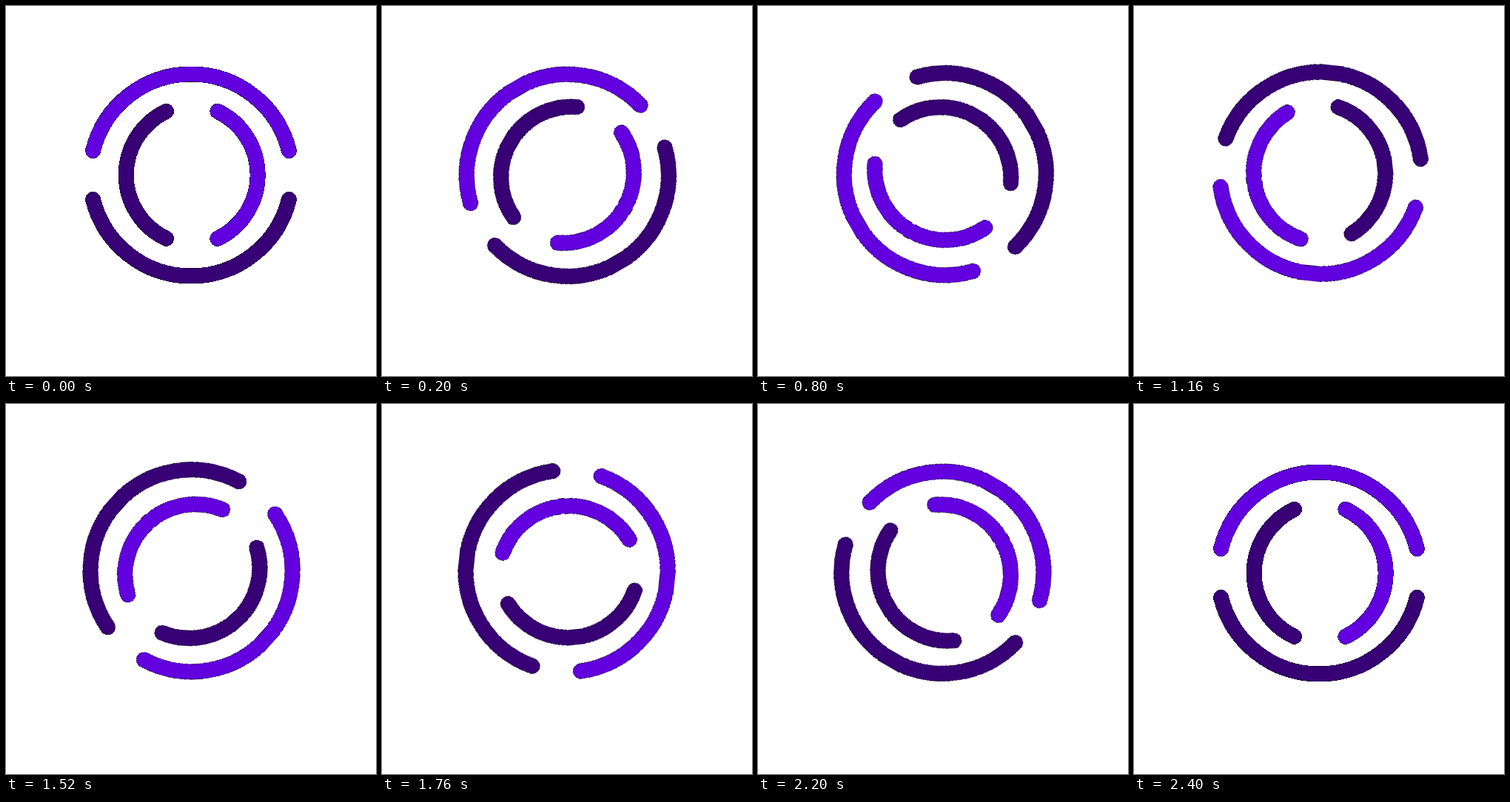
An HTML page without scripts for the animation above (2.42 s loop, 500 by 500 pixels).

```html
<!DOCTYPE html>
<html lang="en">
<head>
<meta charset="utf-8">
<title>Counter-rotating arcs</title>
<style>
  html, body { margin: 0; width: 100%; height: 100%; overflow: hidden; background: #fff; }
  svg { display: block; width: 100vw; height: 100vh; }

  path { fill: none; stroke-linecap: round; }
  .edge { stroke: #0d001c; stroke-width: 21; shape-rendering: crispEdges; }
  .bright { stroke: #6200e0; stroke-width: 20; }
  .dark { stroke: #380075; stroke-width: 20; }

  /* 120 steps of 3deg, then the start pose is held for one more step;
     the small negative delay keeps step boundaries clear of whole ticks */
  .ring { transform-origin: 0 0; animation: 2420ms -1ms infinite steps(120, end); }
  .outer { animation-name: spin-left; }
  .inner { animation-name: spin-right; }
  @keyframes spin-left { 99.1736%, 100% { transform: rotate(-360deg); } }
  @keyframes spin-right { 99.1736%, 100% { transform: rotate(360deg); } }
</style>
</head>
<body>
<svg viewBox="-251 -227 500 500">
  <defs>
    <path id="top" d="M-132.5 -32.8A136.5 136.5 0 0 1 132.5 -32.8"/>
    <path id="bottom" d="M-132.5 32.8A136.5 136.5 0 0 0 132.5 32.8"/>
    <path id="left" d="M-34.6 -86A95.2 95.2 0 0 0 -34.6 86"/>
    <path id="right" d="M34.6 -86A95.2 95.2 0 0 1 34.6 86"/>
  </defs>

  <!-- each ring sits slightly off its pivot, so it wobbles as it turns -->
  <g class="ring outer">
    <g transform="translate(-1 1.5)">
      <use href="#top" class="edge"/>
      <use href="#top" class="bright"/>
      <use href="#bottom" class="edge"/>
      <use href="#bottom" class="dark"/>
    </g>
  </g>
  <g class="ring inner">
    <g transform="translate(.2 1.3)">
      <use href="#left" class="edge"/>
      <use href="#left" class="dark"/>
      <use href="#right" class="edge"/>
      <use href="#right" class="bright"/>
    </g>
  </g>
</svg>
</body>
</html>
```
